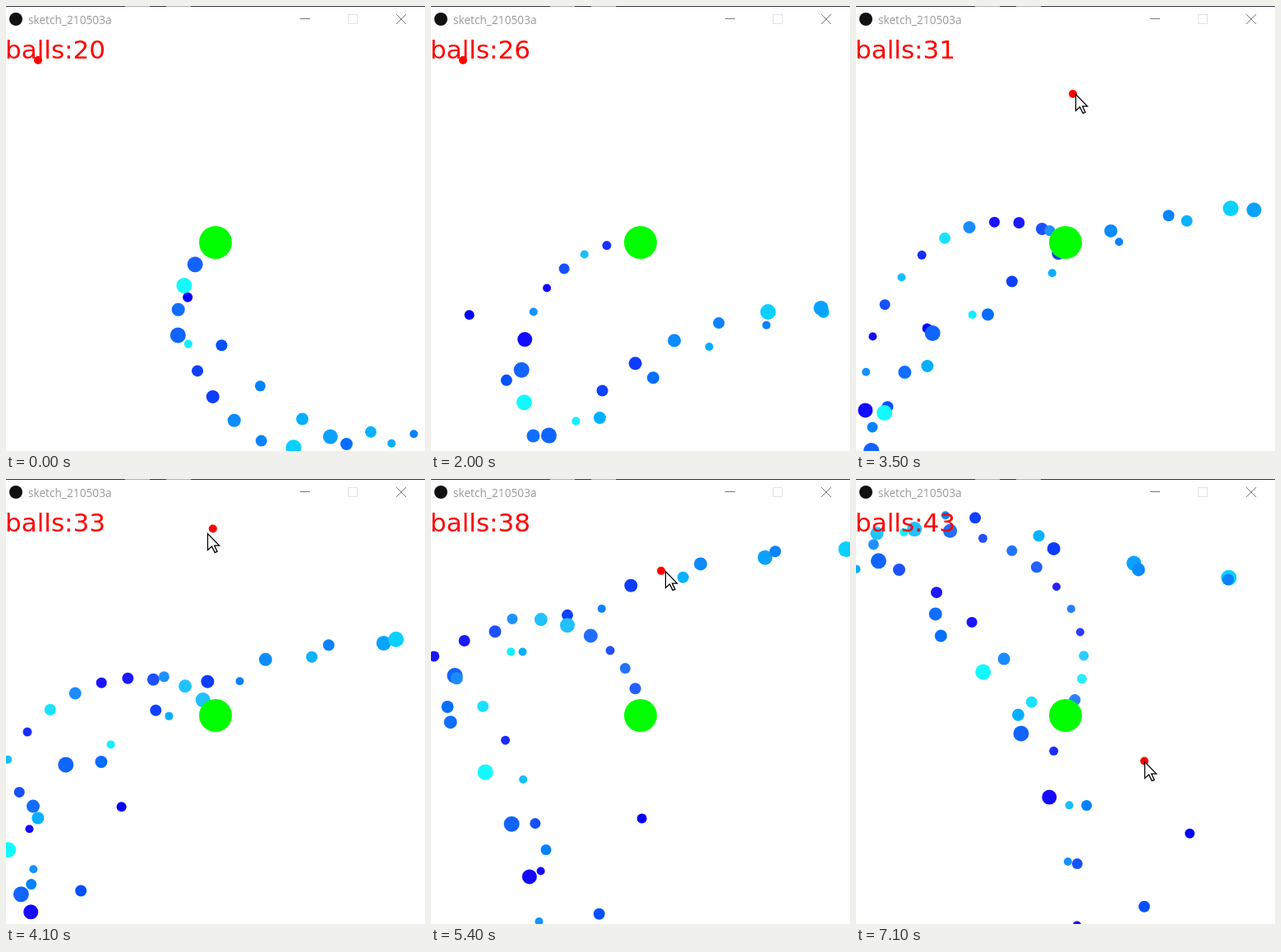
These frames come from a looping animation (510 by 542 pixels, 7.2 s). An HTML page with a canvas:

```html
<!DOCTYPE html>
<html lang="en">
<head>
<meta charset="utf-8">
<title>Balls</title>
<style>
  html, body { margin: 0; width: 100%; height: 100%; overflow: hidden; background: #fff; }
  canvas { display: block; }
</style>
</head>
<body>
<canvas id="stage" width="510" height="542"></canvas>
<script>
const ctx = document.getElementById('stage').getContext('2d');
const LOOP = 7200, STEP = 100, TOP = 32;
const CENTER = { x: 255, y: 288 };
const SPEED = 1.5;       // pixels per tick
const POINTER_IN = 2.2;  // seconds
const POINTER_LAG = 0.05;

const diameters = [
  12, 14, 13, 15, 15, 10, 10, 14, 18, 19, 14, 16, 16, 14, 10,
  19, 16, 19, 19, 18, 10, 10, 13, 10, 11, 14, 15, 13, 14, 15,
  13, 16, 18, 17, 11, 13, 14, 10, 10, 10, 12, 12, 14];
const greens = [
  0, 80, 130, 175, 110, 172, 130, 178, 162, 208, 130, 140, 60, 65, 240,
  100, 110, 250, 100, 10, 145, 10, 80, 190, 45, 225, 140, 20, 25, 80,
  145, 195, 192, 110, 80, 115, 95, 35, 125, 60, 205, 235, 130];

// Each key is [seconds, ...values].
const tickKeys = [[0, 385.3], [1.2, 455], [2.8, 550], [3.5, 592], [4.7, 664.5], [6.1, 748], [7.1, 806.7]];
const pointerKeys = [
  [0, 39, 66], [POINTER_IN, 39, 66], [2.7, 136, 117], [2.9, 136, 117], [3.3, 255, 107],
  [3.5, 267, 107], [3.8, 285, 33], [4.5, 192, 110], [4.7, 216, 110], [5.4, 285, 112],
  [5.9, 325, 154], [6.1, 361, 198], [6.5, 385, 270], [7, 351, 343.5], [7.2, 351, 343.5]];

function sample(keys, t) {
  const i = Math.max(1, keys.findIndex(k => k[0] >= t));
  const a = keys[i - 1], b = keys[i];
  const f = (t - a[0]) / (b[0] - a[0]);
  return a.slice(1).map((v, j) => v + (b[j + 1] - v) * f);
}

// Reflects a straight path between two walls.
function bounce(v, lo, hi) {
  const span = hi - lo;
  const m = (((v - lo) % (2 * span)) + 2 * span) % (2 * span);
  return lo + (m > span ? 2 * span - m : m);
}

// The gap between births shrinks by one tick after every 15 balls.
const birth = n => n <= 15 ? 20 * n : n <= 30 ? 19 * n : 18 * (n + 1);

function disc(x, y, d, color) {
  ctx.fillStyle = color;
  ctx.beginPath();
  ctx.arc(x, y, d / 2, 0, 2 * Math.PI);
  ctx.fill();
}

function line(color, ...pts) {
  ctx.strokeStyle = color;
  ctx.lineWidth = 1;
  ctx.beginPath();
  for (let i = 0; i < pts.length; i += 4) {
    ctx.moveTo(pts[i], pts[i + 1]);
    ctx.lineTo(pts[i + 2], pts[i + 3]);
  }
  ctx.stroke();
}

function text(str, x, y, font, color) {
  ctx.font = font;
  ctx.fillStyle = color;
  ctx.fillText(str, x, y);
}

function drawTitleBar() {
  line('#30343c', 0, 0.5, 510, 0.5);
  line('#b0b0b0', 145, 0.5, 175, 0.5, 195, 0.5, 225, 0.5);
  disc(12, 16, 16, '#111');
  text('sketch_210503a', 27, 21.5, '13.7px "Open Sans", sans-serif', '#999');
  line('#777', 358, 15.5, 370, 15.5, 475, 10, 487, 22, 487, 10, 475, 22);
  ctx.strokeStyle = '#e2e2e2';
  ctx.strokeRect(416.5, 10.5, 11, 11);
}

function drawBalls(tick) {
  let count = 0;
  ctx.save();
  ctx.beginPath();
  ctx.rect(0, TOP, 510, 510);
  ctx.clip();
  diameters.forEach((d, i) => {
    const n = i + 1, travel = (tick - birth(n)) * SPEED;
    if (travel < 0) return;
    count++;
    const angle = n * 7 * Math.PI / 180;
    const x = bounce(CENTER.x + travel * Math.cos(angle), 0, 510);
    const y = bounce(CENTER.y + travel * Math.sin(angle), TOP, 543.5);
    disc(x, y, d, `rgb(${n}, ${greens[i]}, 255)`);
  });
  ctx.restore();
  return count;
}

function drawPointer(x, y) {
  ctx.save();
  ctx.translate(Math.round(x) + 0.5, Math.round(y) + 0.5);
  ctx.scale(1.25, 1.25);
  const arrow = new Path2D('M0 0V16L4 12.5L7 18.5L9.3 17.5L6.5 11.7H11.3Z');
  ctx.fillStyle = '#fff';
  ctx.fill(arrow);
  ctx.strokeStyle = '#000';
  ctx.lineWidth = 1;
  ctx.stroke(arrow);
  ctx.restore();
}

function draw(t) {
  ctx.fillStyle = '#fff';
  ctx.fillRect(0, 0, 510, 542);
  drawTitleBar();
  const count = drawBalls(sample(tickKeys, t)[0]);
  disc(CENTER.x, CENTER.y, 40, '#0f0');
  text('balls:' + count, -1, 64, '31px "DejaVu Sans", sans-serif', '#f00');
  const [dotX, dotY] = sample(pointerKeys, Math.max(0, t - POINTER_LAG));
  disc(dotX, dotY, 10, '#f00');
  if (t >= POINTER_IN) drawPointer(...sample(pointerKeys, t));
}

function loop() {
  draw(Math.floor(performance.now() % LOOP / STEP) * STEP / 1000);
  requestAnimationFrame(loop);
}
loop();
</script>
</body>
</html>
```
